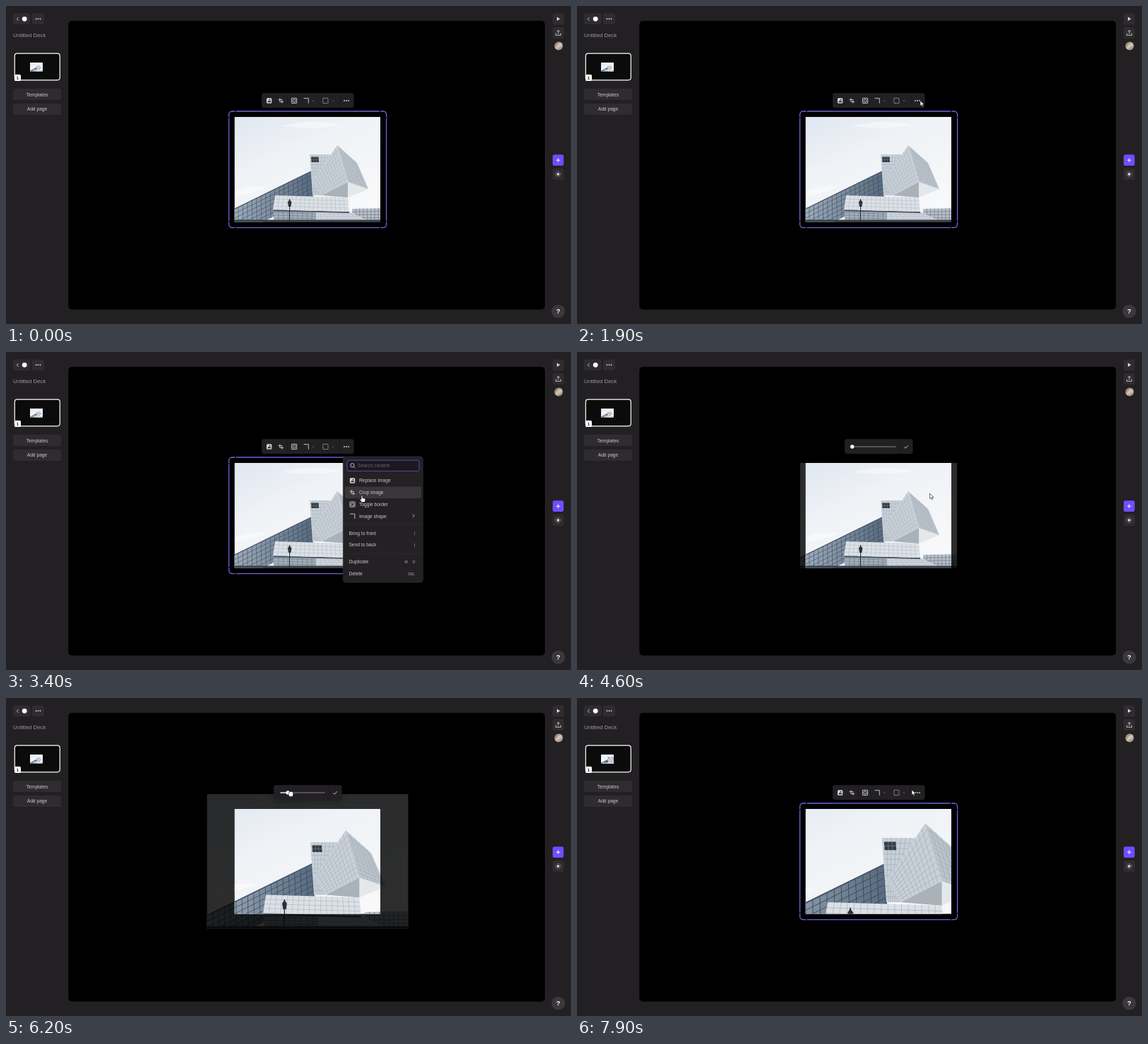
An HTML page for the animation above (8000 ms loop, 800 by 450 pixels).

```html
<!DOCTYPE html>
<html lang="en">
<head>
<meta charset="utf-8">
<title>Crop an image</title>
<style>
  html, body { margin: 0; width: 100%; height: 100%; overflow: hidden; background: #222023; }
  svg { display: block; width: 800px; height: 450px; }
  text { font: 6.7px "Liberation Sans", Arial, sans-serif; fill: #c9c7ca; }
  .mid { text-anchor: middle; }
  .btn { fill: #2e2c2f; }
  .icon { fill: none; stroke: #d4d2d5; stroke-width: .9; }
  .dim { fill: none; stroke: #69676a; stroke-width: .8; }
  .solid { fill: #d4d2d5; }
  .bar { fill: #222023; filter: drop-shadow(0 2px 4px rgba(0, 0, 0, .3)); }
  .line { stroke: #1a181b; stroke-width: .8; }
  .key { font-size: 5.2px; fill: #a9a7aa; font-family: "Liberation Sans", "DejaVu Sans", sans-serif; }
</style>
</head>
<body>
<script>
const LOOP = 8000, MENU = [2100, 3750], CROP = [3750, 6950], SELECT_AGAIN = 7350;
const MAX_ZOOM = 1.57, DRAG = 5640, DRAG_TIME = 1000;
const START = [600, 342];
// Each move: begin, end, then the point it eases to.
const MOVES = [
  [500, 1600, 486, 134], [2300, 3000, 504, 203], [4500, 5350, 390, 134.5],
  [DRAG, DRAG + DRAG_TIME, 412, 136], [6650, 6880, 466, 135], [7250, 7850, 474, 130]
];
const CENTER = [427, 231.2];

const clamp = k => Math.min(1, Math.max(0, k));
const smooth = k => k * k * (3 - 2 * k);
const rowY = i => 182 + 16.8 * i + 7 * Math.max(0, Math.floor(i / 2) - 1);

const box = (x, y, w, h, r, attrs = '') => `<rect x="${x}" y="${y}" width="${w}" height="${h}" rx="${r}" ${attrs}/>`;
const path = (d, cls = 'icon') => `<path d="${d}" class="${cls}"/>`;
const label = (x, y, s, attrs = '') => `<text x="${x}" y="${y}" ${attrs}>${s}</text>`;
const button = (x, y, w, h = 16, attrs = 'class="btn"') => box(x, y, w, h, 2.8, attrs);
const dots = (x, y) => [-3, 0, 3].map(d => `<circle cx="${x + d}" cy="${y}" r=".95" class="solid"/>`).join('');

// A four-cornered wall with n columns and m rows of panels.
function wall([a, b, c, d], fill, n = 1, m = 1, color = '#97a3af', width = .35) {
  const mix = (p, q, k) => p.map((v, i) => (v + (q[i] - v) * k).toFixed(1));
  let lines = '';
  for (let i = 1; i < n; i++) lines += `M${mix(a, b, i / n)}L${mix(d, c, i / n)}`;
  for (let i = 1; i < m; i++) lines += `M${mix(a, d, i / m)}L${mix(b, c, i / m)}`;
  return `<polygon points="${[a, b, c, d].join(' ')}" fill="${fill}"/>
    <path d="${lines}" fill="none" stroke="${color}" stroke-width="${width}"/>`;
}

function building() {
  const apex = [469, 197], left = [434, 249], low = [447, 268], ridge = [484, 249];
  const shoulder = [497, 222], tip = [513, 259], heel = [484, 271];
  const eave = [432, 234], foot = [434, 270], wingEnd = [316, 291];
  const slab = [[381, 268], heel, [486, 291], [378, 288]];
  return `
    ${wall([wingEnd, eave, foot, [316, 330]], 'url(#glass)', 18, 6, '#3b4a5b', .6)}
    <path d="M${wingEnd}L${eave}L${foot}" fill="none" stroke="#4a596b" stroke-width="1.4"/>
    ${wall([[430, 210], [460, 210], [447, 268], [434, 268]], '#c8d0d8', 7, 12)}
    ${wall([[432, 213.5], [442.5, 213.5], [443, 221], [432.5, 221]], '#343b44', 3, 2, '#77828d', .5)}
    ${wall([ridge, tip, heel, low], '#e4e8eb')}
    ${wall([ridge, heel, heel, low], '#a9b1b9')}
    ${wall([apex, ridge, low, left], '#c9d0d7', 9, 11)}
    ${wall([apex, shoulder, tip, ridge], '#bbc3cb', 6, 10)}
    ${wall([[490, 287], [538, 286], [538, 304], [490, 304]], '#b9c0c9', 9, 4, '#7d8894', .9)}
    ${wall([[379, 288], [440, 291], [440, 304], [379, 304]], '#a5b0bc', 9, 4, '#596675', .5)}
    ${wall([[439, 291], [486, 291], [514, 304], [439, 304]], '#d0d6dc', 9, 4)}
    <path d="M379 289.5L486 292" stroke="#4b5664" stroke-width="2"/>
    ${wall(slab, '#dce1e6', 17, 4, '#a0abb6', .4)}
    ${box(316, 302.5, 222, 3, 0, 'fill="#39414b"')}
    <path d="M401.5 273v32" stroke="#222830" stroke-width="1"/>
    <path d="M399 277.5l2.5-4 2.7 4-.9 6.5h-3.3z" fill="#2a313a"/>`;
}

const photoRect = box(316, 157, 222, 148.5, 0, 'fill="url(#sky)"');
const defs = `<defs>
  <linearGradient id="sky" x2=".7" y2="1">
    <stop stop-color="#dfe6f0"/><stop offset=".4" stop-color="#eff2f6"/><stop offset="1" stop-color="#f8f9fa"/>
  </linearGradient>
  <linearGradient id="glass"><stop stop-color="#a3b1c0"/><stop offset="1" stop-color="#586a7f"/></linearGradient>
  <linearGradient id="face" x2="1" y2="1">
    <stop stop-color="#74614e"/><stop offset=".5" stop-color="#c7b8a4"/><stop offset="1" stop-color="#8a7b6c"/>
  </linearGradient>
  <clipPath id="frame">${box(323.7, 157, 206.3, 148.5, .5)}</clipPath>
  <clipPath id="mini">${box(34, 80, 18, 13, 0)}</clipPath>
  <clipPath id="edge">${photoRect}</clipPath>
  <g id="photo" clip-path="url(#edge)">
    ${photoRect}
    <path d="M390 170q40-12 84-2-34 8-84 2ZM324 262q22-8 46-6-18 8-46 14Z" fill="#fff" opacity=".4"/>
    ${building()}
  </g>
</defs>`;

const chrome = `
  ${box(0, 0, 800, 450, 0, 'fill="#222023"')}
  ${box(88.3, 21, 674.7, 408.5, 5)}
  ${button(10, 10.5, 24.5, 15.5)}${path('M17.6 16l-2.3 2.4 2.3 2.4')}
  <circle cx="26.2" cy="18.3" r="3.4" fill="#fff"/>
  ${button(37, 10.5, 17, 15.5)}${dots(45.5, 18.3)}
  ${label(10, 44, 'Untitled Deck', 'style="font-size:7.8px;fill:#9b999c"')}
  ${box(12.3, 67.2, 64, 37.6, 3.5, 'fill="#0b0b0c" stroke="#fff" stroke-width="1.2"')}
  <g clip-path="url(#mini)"><use href="#photo" id="thumb"/></g>
  ${box(12, 97, 9, 9, 1.5, 'fill="#fff"')}${label(16.4, 103.7, '1', 'class="mid" style="font-size:6px;font-weight:bold;fill:#222"')}
  ${['Templates', 'Add page'].map((s, i) => button(10, 117 + 21 * i, 68) + label(44, 127.5 + 20.9 * i, s, 'class="mid"')).join('')}
  ${button(774, 10.5, 16)}${path('M780 15.6l4.7 2.7-4.7 2.7z', 'solid')}
  ${button(774, 30, 16)}${path('M782 39.5v-5M780 36.3l2-2 2 2M778.5 38.6v2.7h7v-2.7')}
  <circle cx="782.5" cy="56.5" r="6" fill="url(#face)"/>
  <path d="M779 60q1-7 4-7 4 0 4 4z" fill="#d9d2c8" opacity=".55"/>
  ${button(774, 210.3, 15.6, 15.8, 'fill="#6d4eff"')}<path d="M781.8 215.4v5.6M779 218.2h5.6" stroke="#fff"/>
  ${button(774, 230, 16)}<circle cx="781.8" cy="238" r="1.9" class="solid"/>
  <circle cx="781.8" cy="238" r="3.6" class="icon" stroke-dasharray="1 1.83"/>
  <circle cx="782" cy="432" r="9.6" fill="#3a383b"/>
  ${label(782, 435.4, '?', 'class="mid" style="font-size:9.5px;font-weight:bold;fill:#fff"')}`;

const pictureIcon = (x, y) => box(x - 3.7, y - 3.7, 7.4, 7.4, 1.5, 'class="solid"') +
  `<path d="M${x - 2.5} ${y + 2.3}l2-2.8 1.3 1.4 1-1 1 2.4z" fill="#222023"/><circle cx="${x + 1}" cy="${y - 1.3}" r=".9" fill="#222023"/>`;
const cropIcon = (x, y) => path(`M${x - 1.5} ${y - 3.6}v5.1h5.1M${x - 3.6} ${y - 1.5}h5.1v5.1`);
const borderIcon = (x, y) => [3.6, 1.8].map(r => box(x - r, y - r, 2 * r, 2 * r, .5, 'class="icon"')).join('');
const cornerIcon = (x, y) => path(`M${x - 3.5} ${y - 3.3}h6.8v7`);
const chevron = x => path(`M${x - 1.4} 133.6l1.4 1.3 1.4-1.3`, 'dim');
const split = x => path(`M${x} 123.3v20.7`, 'line');

const tools = `<g id="tools">
  ${box(362, 123.3, 130.5, 20.7, 3, 'class="bar"')}
  ${pictureIcon(372.6, 134)}${cropIcon(389.3, 134)}${borderIcon(408, 134)}${cornerIcon(425, 134)}
  ${chevron(435)}${box(448.8, 130.4, 7.2, 7.2, .8, 'class="icon" stroke-dasharray="1.4 1"')}${chevron(463)}
  ${split(398.5)}${split(472.5)}${dots(482, 134)}
</g>`;

const selection = `<g id="selection">
  ${box(315.6, 149, 223, 164.6, 4.5, 'fill="none" stroke="#7361dc" stroke-width="1.3"')}
  <path d="${[149, 313.6].map(y => `M325 ${y - 1}v2M529.5 ${y - 1}v2`).join('')}${[315.6, 538.6].map(x => `M${x - 1} 158.2h2M${x - 1} 304.7h2`).join('')}" stroke="#000" stroke-width="1.3"/>
</g>`;

const cropBar = `<g id="cropBar">
  ${box(379, 123.3, 96.5, 20.7, 3, 'class="bar"')}
  <path d="M388.5 134H451.5" stroke="#858387"/>
  <path id="level" stroke="#fff" stroke-width="1.2"/>
  <circle id="knob" cy="134" r="2.7" fill="#fff"/>
  ${split(457.8)}${path('M463.3 134.3l1.8 1.9 3.7-4')}
</g>`;

const ITEMS = ['Replace image', 'Crop image', 'Toggle border', 'Image shape', 'Bring to front', 'Send to back', 'Duplicate', 'Delete'];
const ICONS = [pictureIcon, cropIcon, borderIcon, cornerIcon];
const keyLabel = (x, row, s) => label(x, rowY(row) + 1.9, s, 'class="key mid"');
const menu = `<g id="menu">
  ${box(477.3, 148, 113, 178, 3.5, 'fill="#232124" stroke="#302e31" stroke-width=".7"')}
  ${box(483, 153.2, 102, 15.2, 2, 'fill="#1b191d" stroke="#5546b5"')}
  <circle cx="490.4" cy="160.3" r="2.6" class="icon"/>${path('M492.3 162.4l1.9 2')}
  ${label(498, 163.2, 'Search content', 'style="fill:#69676b"')}
  ${box(480, 0, 108, 16.4, 2, 'id="hover" fill="#39373a"')}
  ${ICONS.map((icon, i) => icon(490.5, rowY(i))).join('')}
  ${ITEMS.map((s, i) => label(ICONS[i] ? 500 : 485.4, rowY(i) + 2.3, s)).join('')}
  ${path('M576 229.7l2 2-2 2')}
  ${keyLabel(578.6, 4, ']')}${keyLabel(578.6, 5, '[')}${keyLabel(566.5, 6, '⌘')}${keyLabel(577.7, 6, 'D')}${keyLabel(574.2, 7, 'DEL')}
  <path d="M477.6 244H590M477.6 285.2H590" stroke="#2f2d30" stroke-width=".7"/>
</g>`;

const cursor = `<g id="cursor" fill="#fff" stroke="#111" stroke-width=".6" stroke-linejoin="round">
  <path id="arrow" d="M0 0V7.4L1.8 5.8 3 8.4 4.3 7.8 3.1 5.3H5.5Z"/>
  <path id="hand" d="M-1 .8a.9 .9 0 0 1 1.8 0V3.6l3.1.7q1.2.3 1 1.5L4.1 9.6H-.4L-3 6q-.3-1.2.8-1.1L-1 5.8Z"/>
  <path id="fist" d="M-3.2 0q0-1.1 1-1v-1.2q.5-1.2 1.5-.5.7-.8 1.6 0 1-.5 1.5.4 1.2-.2 1.2 1V1.4L2.8 4H-1.4L-3.1 1.7Z"/>
</g>`;

document.body.innerHTML = `<svg viewBox="0 0 800 450">${defs}${chrome}
  <use href="#photo" id="faded" opacity=".18"/>
  <g clip-path="url(#frame)"><use href="#photo" id="main"/></g>
  ${selection}${tools}${cropBar}${menu}${cursor}</svg>`;

const $ = id => document.getElementById(id);
const show = (id, on) => $(id).setAttribute('visibility', on ? 'visible' : 'hidden');
const within = (t, [from, to]) => t >= from && t < to;
const place = (id, x, y, scale) =>
  $(id).setAttribute('transform', `translate(${x} ${y}) scale(${scale}) translate(${CENTER.map(v => -v)})`);

function pointer(t) {
  return MOVES.reduce(([x, y], [from, to, toX, toY]) => {
    const k = smooth(clamp((t - from) / (to - from)));
    return [x + (toX - x) * k, y + (toY - y) * k];
  }, START);
}

function draw(t) {
  const cropping = within(t, CROP), menuOpen = within(t, MENU);
  const selected = t < CROP[0] || t >= SELECT_AGAIN;
  const zoom = 1 + (MAX_ZOOM - 1) * clamp((t - DRAG) / DRAG_TIME) ** 1.2;
  const [x, y] = pointer(t);

  place('main', ...CENTER, zoom);
  place('faded', ...CENTER, zoom);
  place('thumb', 43, 86.5, .0874 * (t < CROP[1] ? 1 : zoom));
  show('faded', cropping);
  show('cropBar', cropping);
  show('selection', selected);
  show('tools', selected);

  const knob = 389.7 + 33 * (zoom - 1);
  $('knob').setAttribute('cx', knob);
  $('level').setAttribute('d', `M388.5 134H${knob}`);

  const row = ITEMS.findIndex((_, i) => Math.abs(rowY(i) - y) < 8.4);
  show('menu', menuOpen);
  show('hover', menuOpen && row >= 0);
  $('hover').setAttribute('y', rowY(row) - 8.3);

  const pointing = (menuOpen && y > 170) || within(t, [6780, CROP[1]]);
  const grabbing = within(t, [5300, DRAG + DRAG_TIME]);
  $('cursor').setAttribute('transform', `translate(${x} ${y})`);
  show('arrow', t >= MOVES[0][0] && !pointing && !grabbing);
  show('hand', pointing);
  show('fist', grabbing);
}

function tick() {
  draw(performance.now() % LOOP);
  requestAnimationFrame(tick);
}
tick();
</script>
</body>
</html>
```
